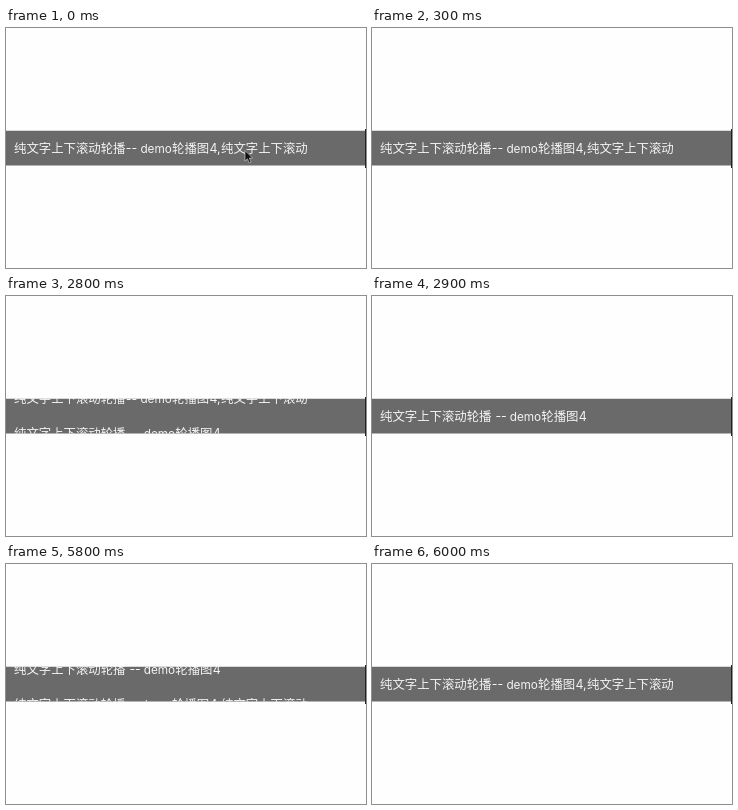
Animation, 360 px wide and 240 px high, one loop 6800 ms. Source, as an HTML page:

```html
<!DOCTYPE html>
<html lang="zh-CN">
<head>
<meta charset="utf-8">
<title>纯文字上下滚动轮播</title>
<style>
  html, body { margin: 0; width: 100%; height: 100%; overflow: hidden; background: #fefefe; }
  svg { display: block; width: 100vw; height: 100vh; }
  text { font: 12.4px "Noto Sans CJK SC", "Noto Sans CJK", sans-serif; fill: #f4f4f4; white-space: pre; }
  .latin { font-family: Inter, sans-serif; font-size: 11.8px; }
  .sign { font-family: Inter, sans-serif; }
</style>
</head>
<body>
<svg viewBox="0 0 360 240">
  <clipPath id="window"><rect y="102" width="360" height="35.5"/></clipPath>
  <rect y="102.75" width="360" height="34.75" fill="#6a6a6a"/>
  <rect x="359" y="101" width="1" height="39" fill="#222"/>
  <g clip-path="url(#window)"><g id="rows"></g></g>
  <path id="cursor" d="M0 0V10.6L2.4 8.3L4.2 12.4L6 11.6L4.3 7.6H7.6Z"
        fill="#111" stroke="#ddd" stroke-width=".6" stroke-linejoin="round"/>
</svg>
<script>
const LOOP = 6800, STEP = 100, ROW_HEIGHT = 35, SCROLL_TIME = 230;
const SCROLL_STARTS = [2685, 5697];
const rows = document.getElementById('rows');
const cursor = document.getElementById('cursor');

const part = (x, text, kind = '') => `<tspan x="${x}" class="${kind}">${text}</tspan>`;
const dashes = x => `<tspan dy="-.6">${part(x, '--', 'sign')}</tspan><tspan dy=".6">&#8203;</tspan>`;
const longLine = part(8, '纯文字上下滚动轮播') + dashes(119.8) +
  part(134.4, 'demo', 'latin') + part(166, '轮播图') + part(203.5, '4,', 'sign') +
  part(215, '纯文字上下滚动');
const shortLine = part(8, '纯文字上下滚动轮播') + dashes(123.4) +
  part(137.7, 'demo', 'latin') + part(169.3, '轮播图') + part(206.7, '4', 'sign');

rows.innerHTML = [longLine, shortLine, longLine]
  .map((line, i) => `<text y="${124.6 + i * ROW_HEIGHT}">${line}</text>`).join('');

function ease(p) {
  p = Math.min(1, Math.max(0, p));
  return p * p * (3 - 2 * p);
}

function draw(now) {
  // The picture advances in steps of a tenth of a second.
  const t = Math.floor((now % LOOP) / STEP) * STEP;
  const progress = SCROLL_STARTS.reduce((sum, start) => sum + ease((t - start) / SCROLL_TIME), 0);
  rows.setAttribute('transform', `translate(0 ${-progress * ROW_HEIGHT})`);

  const move = t / STEP;
  cursor.setAttribute('transform', `translate(${239 + 7 * move} ${122.5 + 2 * move})`);
  cursor.setAttribute('visibility', t < 300 ? 'visible' : 'hidden');
}

const origin = performance.now();
function tick() {
  draw(performance.now() - origin);
  requestAnimationFrame(tick);
}
tick();
</script>
</body>
</html>
```
